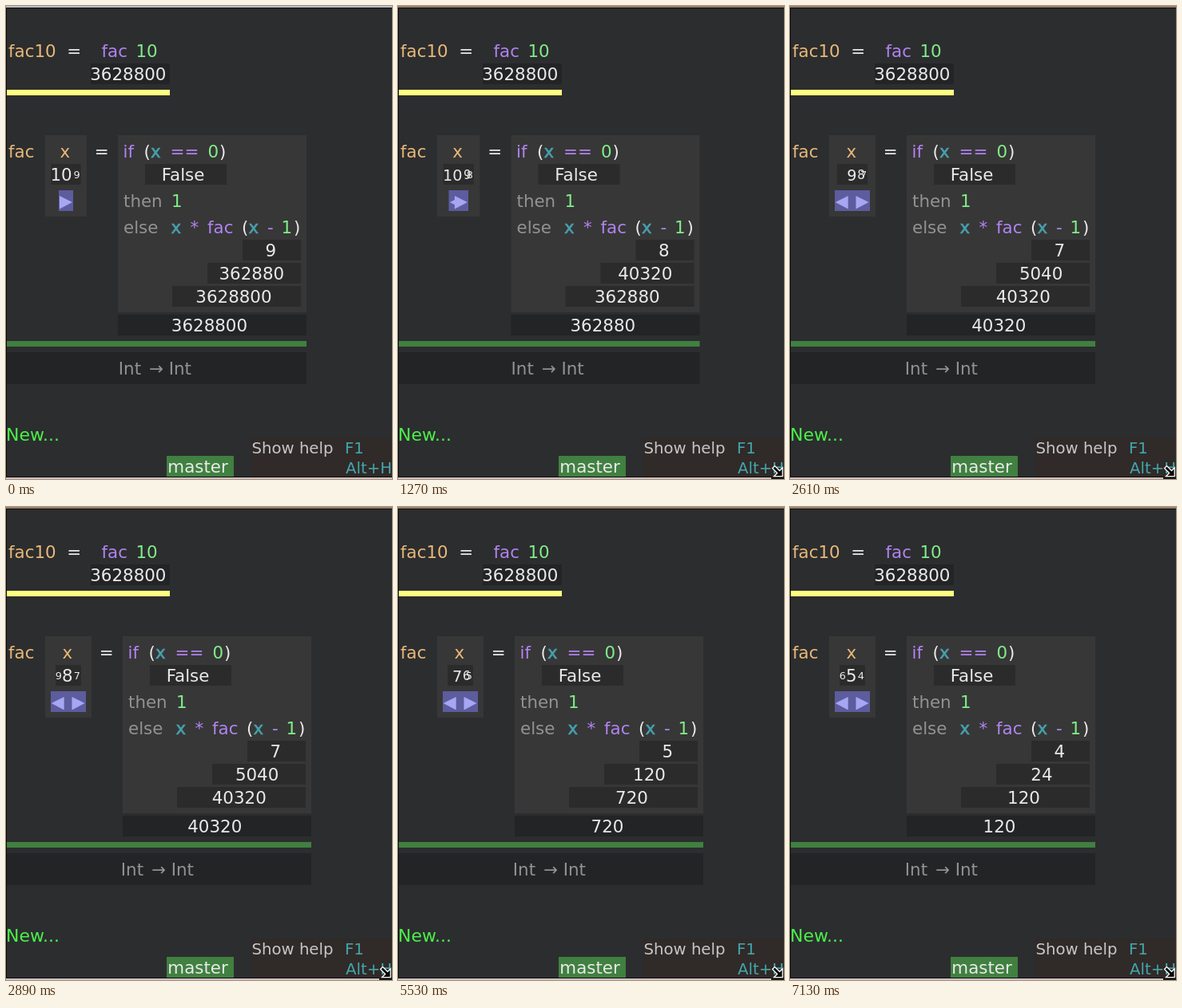
Write an HTML page that moves like this. It is 483 px wide and 593 px high and loops after 8000 ms.

```html
<!DOCTYPE html>
<html>
<head>
<meta charset="utf-8">
<style>
html, body { margin: 0; width: 100%; height: 100%; overflow: hidden; background: #2c2d2f; }
svg { display: block; }
text { font-family: "DejaVu Sans", sans-serif; font-size: 21.4px; white-space: pre; }
</style>
</head>
<body>
<svg id="stage" width="483" height="593" viewBox="0 0 483 593"></svg>
<script>
const NS = "http://www.w3.org/2000/svg";
const stage = document.getElementById("stage");
const LOOP = 8000, FONT = 21.4, DIGIT = 14.4, SMALL = 0.6;
const C = {
  white: "#e9e9e9", orange: "#e8b878", purple: "#b183f0", green: "#80ee88",
  teal: "#47a0ae", grey: "#929292", dark: "#232426", value: "#2b2b2b", panel: "#373737"
};
// start, end, number of steps
const moves = [[1270, 1560, 7], [2610, 2890, 7], [4120, 4350, 6], [5530, 5760, 6], [6840, 7130, 7]];

function add(tag, attrs, parent = stage) {
  const el = document.createElementNS(NS, tag);
  set(el, attrs);
  parent.appendChild(el);
  return el;
}
function set(el, attrs) {
  for (const k in attrs) el.setAttribute(k, attrs[k]);
}
function rect(x, y, x2, y2, fill, parent) {
  return add("rect", { x, y, width: x2 - x, height: y2 - y, fill }, parent);
}
function label(x, y, str, fill, parent, size = FONT) {
  const el = add("text", { x, y, fill, style: `font-size:${size}px` }, parent);
  el.textContent = str;
  return el;
}
function variable(x, y, parent) {
  set(label(x, y, "x", C.teal, parent), { stroke: C.teal, "stroke-width": 0.6 });
}
function span(el, x, x2) {
  set(el, { x, width: x2 - x });
}
const mix = (a, b, p) => a + (b - a) * p;
const fact = n => n < 2 ? 1 : n * fact(n - 1);

// First definition
label(3, 64, "fac10", C.orange);
label(76.3, 64, "=", C.white);
label(119.5, 64, "fac", C.purple);
label(162.5, 64, "10", C.green);
rect(106, 72, 205, 98, C.dark);
label(105.2, 93.3, "3628800", C.white);
rect(1, 105, 205, 112, "#ffff80");

// Second definition: parameter column
label(3, 190, "fac", C.orange);
const column = rect(49, 162, 101, 264, C.panel);
const param = label(67.5, 190, "x", C.orange);
const numBox = rect(56, 198, 94, 224, C.value);
const nums = [0, 1, 2].map(() => label(0, 0, "", C.white));
const buttonBox = rect(66, 231, 84, 257, "#5c5c9e");
const back = add("path", { d: "M8 -8V8.5L-8 0Z", fill: "#a6a6f2" });
const next = add("path", { d: "M-8 -8V8.5L8 0Z", fill: "#a6a6f2" });

// Second definition: body
const body = add("g", {});
label(110.8, 190, "=", C.white, body);
rect(140, 162, 376, 384, C.panel, body);
label(146.5, 190, "if", C.purple, body);
label(172.5, 190, "(", C.white, body);
variable(181, 190, body);
label(205.5, 190, "==", C.purple, body);
label(252.5, 190, "0", C.green, body);
label(267, 190, ")", C.white, body);
rect(174, 198, 276, 224, C.value, body);
label(194.7, 219, "False", C.white, body);
label(147, 252, "then", C.grey, body);
label(207, 252, "1", C.green, body);
label(147, 285, "else", C.grey, body);
variable(206.5, 285, body);
label(230.5, 285, "*", C.purple, body);
label(252, 285, "fac", C.purple, body);
label(295, 285, "(", C.white, body);
variable(303.5, 285, body);
label(327, 285, "-", C.purple, body);
label(344.4, 285, "1", C.green, body);
label(360, 285, ")", C.white, body);

const results = [
  [296, 369, 293, C.value, n => n - 1],
  [252, 369, 322, C.value, n => fact(n - 1)],
  [208, 369, 351, C.value, fact],
  [140, 376, 387, C.dark, fact]
].map(([x, x2, y, fill, calc]) => {
  rect(x, y, x2, y + 26, fill, body);
  return { el: label(0, y + 21.3, "", C.white, body), mid: (x + x2) / 2, calc };
});

const greenBar = rect(1, 420, 376, 427, "#408040");
const typeBox = rect(1, 434, 376, 474, C.dark);
const type = add("g", {});
label(140.8, 462, "Int", C.grey, type);
label(179, 462, "→", C.grey, type);
label(203.7, 462, "Int", C.grey, type);

// Footer
label(0, 545, "New...", "#4af04a", stage, 22);
rect(201, 564, 285, 590, "#408040");
label(202.3, 585.3, "master", C.white);
rect(307, 541, 483, 590, "#302a28");
label(307.5, 561.3, "Show help", "#c6c6c6", stage, 19.7);
label(424, 561.3, "F1", "#42a6ac", stage, 19.7);
label(425, 585.8, "Alt+H", "#42a6ac", stage, 19.7);

// Window edges and pointer
rect(0, 0, 1, 593, "#0a0a0b");
rect(0, 2, 483, 3, "#0c0c0d");
const topEdge = rect(0, 0, 483, 2, "#b9bcc1");
rect(0, 590, 483, 591, "#0c0c0d");
rect(0, 591, 483, 593, "#cdbfc3");
const pointer = add("g", {});
rect(467, 590, 483, 593, "#161617", pointer);
add("path", {
  d: "M469.5 579.5L471.5 577.5L477.5 583.5L480.5 580.5V589H472L475.5 585.5Z",
  fill: "#000", stroke: "#fff", "stroke-width": 2.6, "paint-order": "stroke"
}, pointer);

// Resting places of the previous, current and next argument
function layout(n) {
  const first = n === 10, small = DIGIT * SMALL;
  const prevW = first ? 0 : small * String(n + 1).length;
  const curW = DIGIT * String(n).length;
  const half = (prevW + curW + small) / 2;
  const left = (first ? 75 : 78) - half;
  return {
    left, right: left + 2 * half,
    prev: { x: left, s: SMALL },
    cur: { x: left + prevW, s: 1 },
    next: { x: left + prevW + curW, s: SMALL }
  };
}

function place(el, n, a, b, p) {
  const scale = mix(a.s, b.s, p), size = FONT * scale;
  set(el, { x: mix(a.x, b.x, p) - 0.8 * scale, y: 211.5 + 0.364 * size });
  el.style.fontSize = size + "px";
  el.textContent = n > 10 ? "" : n;
}

function draw(t) {
  const done = moves.filter(m => t >= m[0]).length;
  const n = 10 - done;
  let p = 1;
  if (done) {
    const [start, end, steps] = moves[done - 1];
    const k = Math.floor((t - start) * (steps - 1) / (end - start));
    if (k < steps - 1) p = 1 - 0.75 * Math.pow(0.474, k);
  }
  const to = layout(n), from = done ? layout(n + 1) : to;
  span(numBox, mix(from.left, to.left, p), mix(from.right, to.right, p));
  place(nums[0], n + 1, from.cur, to.prev, p);
  place(nums[1], n, from.next, to.cur, p);
  place(nums[2], n - 1, from.next, to.next, p);

  // The column widens only on the first move
  const w = done === 0 ? 0 : done === 1 ? p : 1;
  span(column, 49, 101 + 6 * w);
  set(param, { x: 67.5 + 3 * w });
  span(buttonBox, mix(66, 56, w), mix(84, 100, w));
  set(back, {
    transform: `translate(${mix(70, 64.7, w)} 246) scale(${mix(0.3, 1, w)})`,
    visibility: w ? "visible" : "hidden"
  });
  set(next, { transform: `translate(${mix(75, 90.5, w)} 246)` });
  set(body, { transform: `translate(${6 * w} 0)` });
  set(type, { transform: `translate(${3 * w} 0)` });
  span(greenBar, 1, 376 + 6 * w);
  span(typeBox, 1, 376 + 6 * w);

  for (const r of results) {
    const str = String(r.calc(n));
    r.el.textContent = str;
    set(r.el, { x: r.mid - str.length * DIGIT / 2 - 0.8 });
  }

  const away = t >= 500;
  set(topEdge, { fill: away ? "#977f69" : "#b9bcc1" });
  set(pointer, { visibility: away ? "visible" : "hidden" });
}

function tick() {
  draw(performance.now() % LOOP);
  requestAnimationFrame(tick);
}
tick();
</script>
</body>
</html>
```
